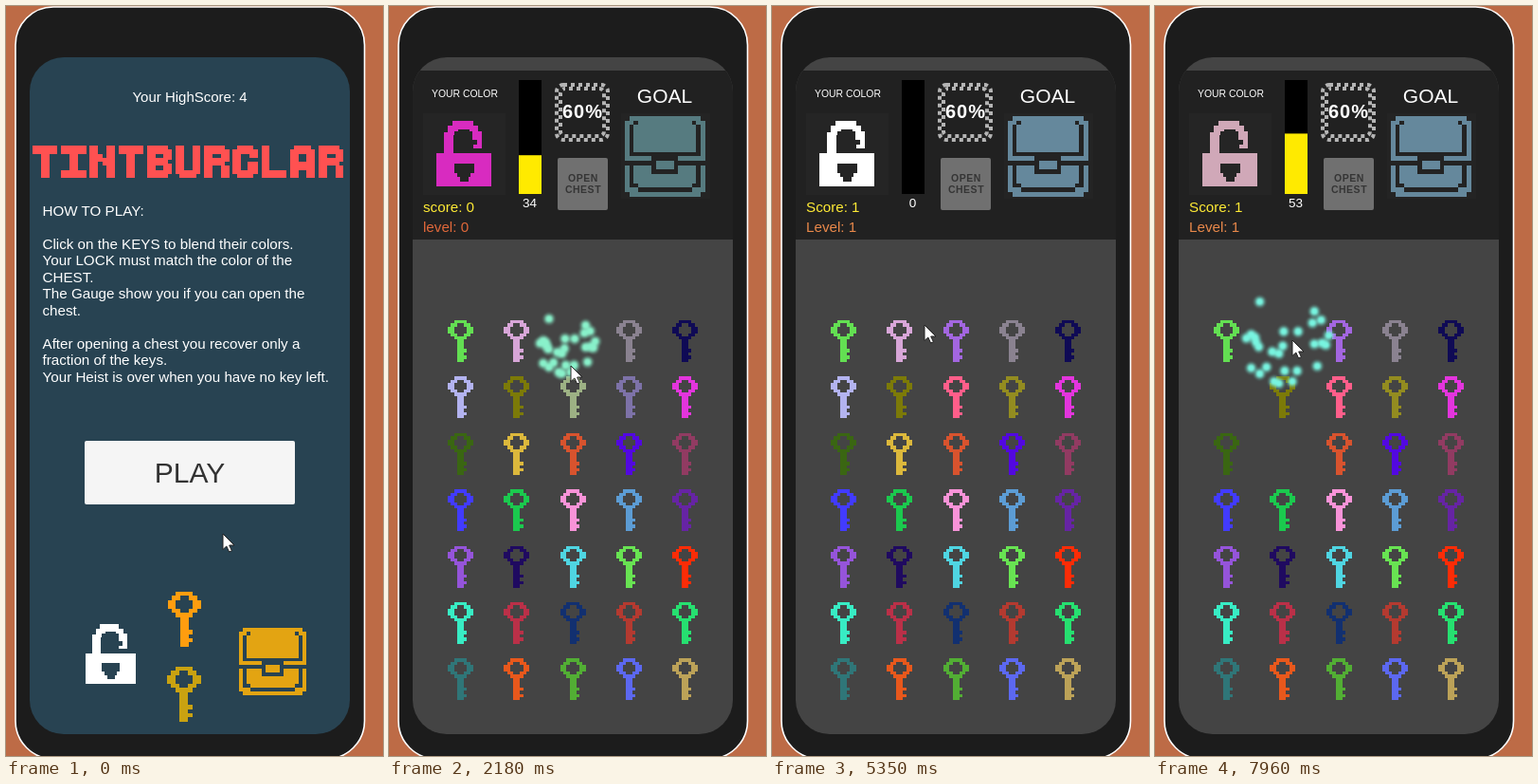
An HTML page for the animation above (8000 ms loop, 398 px wide and 790 px high).

```html
<!DOCTYPE html>
<html lang="en">
<head>
<meta charset="utf-8">
<title>Tintburglar</title>
<style>
  html, body { margin: 0; height: 100%; overflow: hidden; background: #bd6b46; }
  svg { display: block; font-family: "Liberation Sans", Arial, sans-serif; }
  .pixel { shape-rendering: crispEdges; fill-rule: evenodd; }
  .mid { text-anchor: middle; }
  .bold { font-weight: bold; }
</style>
</head>
<body>
<svg id="stage" width="398" height="790" viewBox="0 0 398 790">
  <defs>
    <clipPath id="screen"><rect x="25" y="54" width="338" height="713" rx="36"/></clipPath>
    <filter id="soft" x="-50%" y="-50%" width="200%" height="200%"><feGaussianBlur stdDeviation="1.2"/></filter>
    <filter id="puff" x="-50%" y="-50%" width="200%" height="200%"><feGaussianBlur stdDeviation="3"/></filter>
  </defs>
  <rect width="398" height="790" fill="#bd6b46"/>
  <rect x="10" y="1" width="368.5" height="792" rx="40" fill="#1c1c1c" stroke="#fff" stroke-width="1.6"/>
  <g clip-path="url(#screen)">
    <g id="menu" fill="#fff">
      <rect x="25" y="54" width="338" height="713" fill="#284352"/>
      <text class="mid" x="194" y="101" font-size="15">Your HighScore: 4</text>
      <g id="title" class="pixel" fill="none" stroke="#ff5151" stroke-width="2"></g>
      <g id="rules" font-size="15.2"></g>
      <rect id="play" x="83" y="458" width="222" height="67" rx="2"/>
      <text class="mid" x="194" y="502" font-size="30" fill="#323232">PLAY</text>
    </g>
    <g id="game" fill="#fff">
      <rect x="25" y="54" width="338" height="713" fill="#444"/>
      <rect x="25" y="68" width="338" height="178" fill="#212121"/>
      <rect x="36" y="113" width="87" height="86" fill="#252525"/>
      <rect x="245" y="113" width="94" height="90" fill="#242424"/>
      <text class="mid" x="80" y="96" font-size="10.4">YOUR COLOR</text>
      <text class="mid" x="291" y="102" font-size="21">GOAL</text>
      <text id="score" x="36" y="217" font-size="15.2" fill="#ffeb35"></text>
      <text id="level" x="36" y="238" font-size="15.2"></text>
      <rect x="137" y="78" width="24" height="120" fill="#000"/>
      <rect id="gauge" x="137" width="24"/>
      <text id="percent" class="mid" x="148.5" y="212" font-size="13.5"></text>
      <g fill="none" stroke="#b4b4b4" stroke-width="4" stroke-dasharray="4">
        <rect x="177" y="83" width="54" height="58" rx="7"/>
        <rect x="181" y="87" width="46" height="50" rx="5" stroke-dashoffset="4"/>
      </g>
      <text class="mid bold" x="204.5" y="118" font-size="20" letter-spacing="1">60%</text>
      <rect id="open" x="178" y="160" width="53" height="55" rx="2"/>
      <g class="mid bold" font-size="10.5" letter-spacing=".5" fill="#353535">
        <text x="205" y="185">OPEN</text><text x="205" y="197">CHEST</text>
      </g>
      <g id="keys"></g>
      <g id="bursts"></g>
    </g>
  </g>
  <path id="cursor" d="M0 0V16.5L3.8 13L6.6 19L9.4 17.8L6.7 12H12Z" fill="#fff" stroke="#222" stroke-width="1"/>
</svg>
<script>
const LOOP = 8000, GAME_START = 820, OPEN_AT = 4640, BURST_LIFE = 550;
const $ = id => document.getElementById(id);

function add(parent, tag, attrs, text) {
  const el = document.createElementNS("http://www.w3.org/2000/svg", tag);
  set(el, attrs);
  if (text) el.textContent = text;
  return parent.appendChild(el);
}
function set(el, attrs) {
  for (const name in attrs) el.setAttribute(name, attrs[name]);
}
const clamp = v => Math.max(0, Math.min(1, v));
const mix = (a, b, k) => a + (b - a) * k;
const show = (el, on) => el.style.display = on ? "" : "none";

const KEY = "M2 0h4v1h1v1h1v2h-1v1h-1v1h-1v3h1v1h-1v1h1v1h-1v1h-2V6h-1V5h-1V4h-1V2h1V1h1z" +
  "M3 1h2v1h1v2h-1v1h-2v-1h-1V2h1z";
const LOCK = "M8 34V12h4V5h5V0h22v5h5v6h4v18h-9v-4h4v-5h-5V11h-3V9h-12v2h-4v4h-1V34z" +
  "M0 34h58v35h-58zM19 45h21v10h-4v4h-2v5h-9v-5h-3v-4h-3z";
const CHEST = "M1 0h16v1h1v16h-1v1H1v-1H0V1h1z";
const CHEST_LINES = "M1 2h1v6h-1zM16 2h1v6h-1zM2 1h1v1h-1zM15 1h1v1h-1zM1 8h16v1h-16z" +
  "M0 10h6v1h-6zM12 10h6v1h-6zM6 9h6v4h-6zM7 10h4v2h-4zM1 11h1v5h-1zM16 11h1v5h-1z" +
  "M2 15h1v1h-1zM15 15h1v1h-1zM3 16h12v1h-12z";

function sprite(parent, d, x, y, scale, fill) {
  return add(parent, "path", { class: "pixel", d, fill, transform: `translate(${x} ${y}) scale(${scale})` });
}
function chest(parent, x, y, scale, fill, lines) {
  const body = sprite(parent, CHEST, x, y, scale, fill);
  sprite(parent, CHEST_LINES, x, y, scale, lines);
  return body;
}

// Menu
const GLYPHS = {
  T: "M0 1H6M3 1V8", I: "M0 1H6M3 1V7M0 7H6", N: "M1 0V8M5 0V8M2 3H3M3 4H4",
  B: "M1 0V8M1 1H5M1 4H5M1 7H5M5 1V3.5M5 4.5V7", U: "M1 0V7M5 0V7M1 7H5",
  R: "M1 0V8M1 1H5M5 1V4M1 4H5M5 5V8", G: "M1 1V7M1 1H5M5 1V3M1 7H5M5 4V7M3.5 5H5",
  L: "M1 0V8M1 7H6", A: "M1 1V8M5 1V8M1 1H5M1 5H5"
};
[..."TINTBURGLAR"].forEach((letter, i) => add($("title"), "path", {
  d: GLYPHS[letter], transform: `translate(${28 + i * 30.2} 147) scale(4.4 4.25)`
}));
["HOW TO PLAY:", "", "Click on the KEYS to blend their colors.", "Your LOCK must match the color of the",
  "CHEST.", "The Gauge show you if you can open the", "chest.", "",
  "After opening a chest you recover only a", "fraction of the keys.",
  "Your Heist is over when you have no key left."
].forEach((line, i) => add($("rules"), "text", { x: 38.5, y: 221 + i * 17.45 }, line));
sprite($("menu"), LOCK, 84, 651, .91, "#fff");
sprite($("menu"), KEY, 170.5, 617, 4.45, "#ff9d0f");
sprite($("menu"), KEY, 170, 696, 4.45, "#c9a211");
chest($("menu"), 246, 655, 3.94, "#e3a412", "#284352");

// Game
const KEY_COLORS = ("63df52 d8a6d8 d82bc0 8a8290 0f0a55 b3b3f0 7c7a08 9db184 7d72a8 e335dd " +
  "3a6612 dcb83c d8532e 5208e0 913b62 423bff 1bc94e f893d8 5c9cd4 6624a4 " +
  "9554da 1f0a60 4fd5e2 68e352 fb2c07 38ecc4 ba3048 123070 b43a30 26e070 " +
  "2f7678 e8581c 52ae34 5c68f0 bca258").split(" ").map(c => "#" + c);
const NEW_COLORS = { 2: "#a366e0", 7: "#ff5e8a", 8: "#938c20" };
const clicks = [
  { at: 1930, x: 192, y: 356, key: 2, lock: "#d82bc0", match: 34 },
  { at: 2330, x: 193, y: 408, key: 7, lock: "#b870a0", match: 56 },
  { at: 3280, x: 253, y: 408, key: 8, lock: "#9a70a2", match: 69 },
  { at: 5760, x: 91, y: 411, key: 5, lock: "#b3b3f0", match: 64 },
  { at: 6720, x: 131, y: 472, key: 11, lock: "#c8b698", match: 51 },
  { at: 7535, x: 145, y: 351, key: 1, lock: "#d0a8b8", match: 53 }
];
const keyPos = i => [62 + i % 5 * 59.3, 331 + Math.floor(i / 5) * 59.4];
const keys = KEY_COLORS.map((color, i) => sprite($("keys"), KEY, ...keyPos(i), 3.38, color));
const lock = sprite($("game"), LOCK, 50, 121, 1, "#fff");
const goal = chest($("game"), 249, 116, 4.7, "#567b80", "#232323");
$("game").append($("bursts"));

// Directions in which the sparks of a burst fly
const SPARKS = [[-34, -39], [23, -29], [21, -17], [30, -20], [-9, -8], [6, -8], [-48, -1], [-43, -5],
  [-38, 3], [-35, 8], [-10, 7], [-21, 13], [-14, 15], [38, -4], [23, 5], [31, 4], [35, 6], [26, 28],
  [-43, 30], [-27, 29], [-34, 36], [-8, 33], [5, 33], [-19, 44], [-14, 46], [0, 44], [-39, -2]];
for (const click of clicks) {
  click.group = add($("bursts"), "g", {});
  const [kx, ky] = keyPos(click.key);
  click.puff = add(click.group, "circle", { cx: kx + 75 - 62, cy: ky + 21, r: 17, fill: "#fff", filter: "url(#puff)" });
  click.cloud = add(click.group, "g", { filter: "url(#soft)", "stroke-width": 5, "stroke-opacity": .35 });
  click.core = add(click.cloud, "circle", { cx: click.x, cy: click.y, r: 14 });
  click.sparks = SPARKS.map(() => add(click.cloud, "circle", { r: 3.8 }));
}

function drawBurst(click, t) {
  const age = t - click.at, on = age >= 0 && age < BURST_LIFE;
  show(click.group, on);
  if (!on) return;
  const spread = .2 + .8 * age / 420, k = clamp(age / 300), flash = 1 - clamp(age / 110);
  const color = `rgb(${mix(226, 120, k)},${mix(232, 244, k)},${mix(88, 224, k)})`;
  set(click.cloud, { fill: color, stroke: color, opacity: clamp((BURST_LIFE - age) / 110) });
  set(click.puff, { opacity: flash * .9 });
  set(click.core, { opacity: flash });
  click.sparks.forEach((spark, i) => set(spark, {
    cx: click.x + SPARKS[i][0] * spread, cy: click.y + SPARKS[i][1] * spread
  }));
}

// Pointer stops: time, x, y
const PATH = [[0, 229, 556], [119, 229, 556], [120, 228, 556], [280, 228, 556], [640, 258, 503],
  [1110, 258, 503], [1570, 210, 370], [1890, 192, 356], [2080, 192, 356], [2300, 192, 407],
  [3060, 192, 407], [3260, 253, 408], [4040, 253, 408], [4200, 218, 240], [4420, 209, 184],
  [4940, 209, 184], [5350, 161, 336], [5680, 91, 411], [5830, 91, 411], [6310, 131, 472],
  [6950, 131, 472], [7450, 145, 352], [LOOP, 145, 352]];
function pointer(t) {
  const i = PATH.findIndex(p => p[0] > t), a = PATH[i - 1], b = PATH[i];
  const k = (t - a[0]) / (b[0] - a[0]);
  return [mix(a[1], b[1], k), mix(a[2], b[2], k)].map(Math.round);
}

// The button fades between its disabled and enabled tints in 100 ms
function openTint(t) {
  const ramp = start => clamp((t - start) / 100);
  const on = ramp(3280) - ramp(OPEN_AT - 30) + ramp(5760) - ramp(6690);
  const v = Math.round(mix(112, 245, on));
  return `rgb(${v},${v},${v})`;
}

function render(t) {
  const playing = t >= GAME_START, opened = t >= OPEN_AT;
  show($("menu"), !playing);
  show($("game"), playing);
  set($("play"), { fill: t > 700 ? "#c8c8c8" : "#f5f5f5" });

  const used = clicks.filter(c => c.at <= t && (c.at > OPEN_AT) === opened);
  const { lock: color, match } = used[used.length - 1] || { lock: "#fff", match: 0 };
  lock.setAttribute("fill", color);
  goal.setAttribute("fill", opened ? "#65889c" : "#567b80");
  set($("gauge"), { y: 198 - match * 1.2, height: match * 1.2, fill: match >= 60 ? "#0f0" : "#ffea00" });
  $("percent").textContent = match;
  $("score").textContent = opened ? "Score: 1" : "score: 0";
  $("level").textContent = opened ? "Level: 1" : "level: 0";
  set($("level"), { fill: opened ? "#e8884a" : "#e0683a" });
  set($("open"), { fill: openTint(t) });
  keys.forEach((key, i) => {
    show(key, !used.some(c => c.key === i));
    key.setAttribute("fill", opened && NEW_COLORS[i] || KEY_COLORS[i]);
  });
  clicks.forEach(c => drawBurst(c, t));
  set($("cursor"), { transform: `translate(${pointer(t)})` });
}

const began = performance.now();
function tick() {
  render((performance.now() - began) % LOOP);
  requestAnimationFrame(tick);
}
tick();
</script>
</body>
</html>
```
